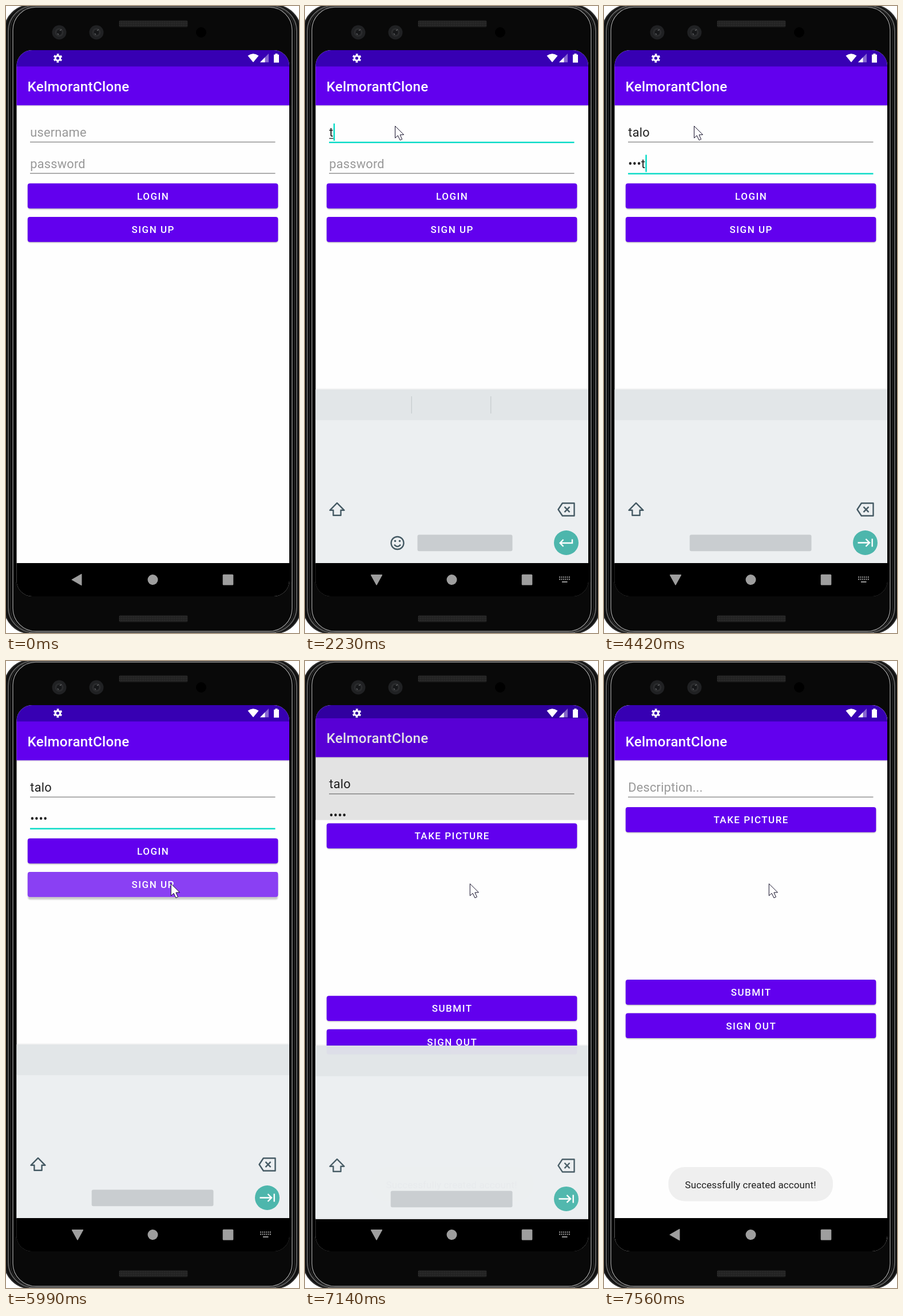
An HTML page for the animation above (8 s loop, 512x1094 px).

```html
<!DOCTYPE html>
<html lang="en">
<head>
<meta charset="utf-8">
<title>Sign up</title>
<style>
html, body { margin: 0; width: 100%; height: 100%; overflow: hidden; background: #fff; }
svg { display: block; width: 512px; height: 1094px; font-family: Roboto, sans-serif; }
.title { font-size: 24.2px; font-weight: 500; letter-spacing: .3px; fill: #fff; }
.input { font-size: 21.8px; letter-spacing: .2px; fill: #212121; }
.hint { fill: #999; }
.label { font-size: 17px; font-weight: 500; letter-spacing: 1.5px; fill: #fff; text-anchor: middle; }
.icon { fill: none; stroke: #455a64; stroke-width: 2.4; stroke-linejoin: round; }
.enter { fill: none; stroke: #fff; stroke-width: 2.4; }
</style>
</head>
<body>
<svg id="stage" viewBox="0 0 512 1094"></svg>
<script>
const LOOP = 8000;
const USER = 'talo', SECRET = 'tilt';
const USER_KEYS = [2230, 2320, 2560, 2710];
const SECRET_KEYS = [3980, 4050, 4280, 4420];
const USER_CARET = [[1200, 1750], [2230, 3190]];
const SECRET_CARET = [[3190, 3570], [3980, 4900], [5400, 5920], [6450, 6990]];
const SCREEN = { x: 18.5, y: 77, w: 476.5, h: 953 };
const USER_Y = 228, SECRET_Y = 282.6, TEXT_X = 42.3;

const rect = (x, y, w, h, fill, more = '') =>
  `<rect x="${x}" y="${y}" width="${w}" height="${h}" fill="${fill}" ${more}/>`;
const circle = (x, y, r, fill, more = '') =>
  `<circle cx="${x}" cy="${y}" r="${r}" fill="${fill}" ${more}/>`;
const path = (d, more = '') => `<path d="${d}" ${more}/>`;
const text = (x, y, cls, value, more = '') =>
  `<text x="${x}" y="${y}" class="${cls}" ${more}>${value}</text>`;
const group = (id, body, more = '') => `<g id="${id}" ${more}>${body}</g>`;

function button(y, label, id = '') {
  const ripple = id && `<g clip-path="url(#buttonClip)">${circle(292, 390, 0, '#fff', `id="${id}Ripple"`)}</g>`;
  return rect(38.3, y + 1.2, 436.8, 43.6, '#000', `rx="4" opacity=".3" filter="url(#soft)" ${id && `id="${id}Shadow"`}`) +
    rect(37.8, y, 437.6, 43.7, '#6200ee', 'rx="4"') + ripple + text(257.2, y + 28.2, 'label', label);
}

const field = (id, y, hint) =>
  text(TEXT_X, y, 'input hint', hint, `id="${id}Hint"`) +
  text(TEXT_X, y, 'input', '', `id="${id}Text"`) +
  rect(42, y + 8.7, 428.5, 1.4, '#8c8c8c', `id="${id}Line"`) +
  rect(42.4, y - 23, 2.4, 30, '#03dac5', `id="${id}Caret"`);

const appWindow = body =>
  rect(18, 77, 478, 954, '#fefefe') + rect(18, 173, 478, 2, '#000', 'opacity=".1"') +
  rect(18, 77, 478, 29, '#3700b3') + rect(18, 105.5, 478, 67.8, '#6200ee') +
  text(37.5, 149, 'title', 'KelmorantClone') + body;

const speaker = y => rect(197.5, y, 120, 12, '#1e1e1e', 'rx="2"') +
  rect(198, y + 1, 119, 10, 'url(#mesh)');

const lens = x => circle(x, 46, 12.5, '#202123') + circle(x, 46, 7.5, '#2b2c2e') +
  circle(x, 46, 4.5, '#17181a') +
  path(`M${x - 3} 48l2 2M${x + 1} 43l3 -2`, 'stroke="#66686a" stroke-width="1.3"');

const body =
  rect(-3, -1.5, 518, 1096, '#101010', 'rx="46" stroke="#2c2c2c" stroke-width="2"') +
  rect(4, 0, 504, 1093, '#0a0a0a', 'rx="44" stroke="#5c5c5c" stroke-width="2"') +
  rect(8, 1, 496, 1091, '#000', 'rx="42" stroke="#2a2a2a" stroke-width="1.6"') +
  rect(12, 2, 488, 1089, '#090909', 'rx="40" stroke="#8a8a8a" stroke-width="1.5"') +
  rect(14, 100, 485, 905, '#000') +
  lens(93) + lens(158) + circle(341, 46, 9, '#000') + speaker(25) + speaker(1063) +
  rect(40, 1093, 432, 1, '#777');

const statusIcons =
  circle(90.5, 91, 4.2, 'none', 'stroke="#fff" stroke-width="3.2"') +
  circle(90.5, 91, 6.6, 'none', `stroke="#fff" stroke-width="2.4" stroke-dasharray="3.7 3.21"
    stroke-dashoffset="1.85" transform="rotate(30 90.5 91)"`) +
  path('M422.5 86.8Q432 79.8 441.5 86.8L432 98.3Z', 'fill="#fff"') +
  path('M459 83V98.3H444Z', 'fill="#fff" opacity=".4"') +
  path('M452.5 89.6V98.3H444Z', 'fill="#fff"') +
  path('M468 84.8h2.5v-1.8h4v1.8h2.5v14h-9Z', 'fill="#fff"');

let keyDots = rect(449, 1003.8, 9.5, 2, '#9e9e9e');
for (let i = 0; i < 12; i++)
  keyDots += rect(444 + (i % 6) * 3.4, 995.5 + (i / 6 | 0) * 3.8, 2, 2, '#9e9e9e');

const rounded = 'stroke="#9e9e9e" stroke-width="1.4" stroke-linejoin="round"';
const navIcons = `<g fill="#9e9e9e">` +
  path('M115.3 1001L131.8 991.5V1010.5Z', `id="back" ${rounded}`) +
  group('imeNav', path('M115.6 992.8H134.4L125 1009.8Z', rounded) + keyDots) +
  `<circle cx="256.5" cy="1001" r="9"/><rect x="378.7" y="991.8" width="18.6" height="18.6" rx="1.5"/></g>`;

const keyboard =
  rect(18, 667, 478, 2, '#000', 'opacity=".04"') + rect(18, 669, 478, 54, '#e2e6e8') +
  rect(18, 722.5, 478, 250, '#eceff1') + rect(18, 972, 478, 60, '#000') +
  path('M43.5 879.8L56 867.2L68.5 879.8H62.6V888.8H49.4V879.8Z', 'class="icon"') +
  path('M449.8 867.5H470.5V889.5H449.8L442.5 878.5ZM453.5 873.8l9 9.4m0 -9.4l-9 9.4', 'class="icon"') +
  rect(196.5, 922.5, 166, 28.7, '#c9cdd0', 'rx="3" id="space"') +
  circle(456.5, 936.5, 21.5, '#4db6ac') +
  group('plainKeys',
    rect(185.7, 681, 1, 30, '#bfc5c8') + rect(324.3, 681, 1, 30, '#bfc5c8') +
    circle(161.5, 937, 11, 'none', 'class="icon"') +
    circle(157.5, 933.5, 1.8, '#455a64') + circle(165.5, 933.5, 1.8, '#455a64') +
    path('M156 939.8Q161.5 946.5 167 939.8', 'class="icon"') +
    path('M467 930.5V937H446M451.5 931L445.7 937L451.5 943', 'class="enter"')) +
  group('secretKeys', path('M443.5 936.5H463M457.5 930L464 936.5L457.5 943M468.7 929.5V943.5', 'class="enter"'));

const login = appWindow(
  field('user', USER_Y, 'username') + rect(TEXT_X, 230.4, 0, 1.3, '#212121', 'id="compose"') +
  field('secret', SECRET_Y, 'password') + button(309.6, 'LOGIN') + button(368, 'SIGN UP', 'press'));

const post = appWindow(
  text(TEXT_X, USER_Y, 'input hint', 'Description...') + rect(42, 236.7, 428.5, 1.4, '#8c8c8c') +
  button(255, 'TAKE PICTURE') + button(556, 'SUBMIT') + button(614.4, 'SIGN OUT'));

const toast = rect(112.5, 883, 287.5, 59.5, '#efefef', 'rx="28"') +
  text(141.5, 919.5, '', 'Successfully created account!', 'font-size="17" letter-spacing=".1" fill="#212121"');

const stage = document.getElementById('stage');
stage.innerHTML = `<defs>
  <clipPath id="screenClip">${rect(SCREEN.x, SCREEN.y, SCREEN.w, SCREEN.h, '#000', 'rx="27"')}</clipPath>
  <clipPath id="buttonClip">${rect(37.8, 368, 437.6, 43.7, '#000', 'rx="4"')}</clipPath>
  <clipPath id="revealClip">${rect(18, 77, 478, 954, '#000', 'id="reveal"')}</clipPath>
  <filter id="soft" x="-5%" y="-20%" width="110%" height="140%"><feGaussianBlur stdDeviation="1"/></filter>
  <pattern id="mesh" width="3" height="3" patternUnits="userSpaceOnUse">${rect(0, 0, 1.5, 1.5, '#3a3a3a')}</pattern>
  </defs>` + body + group('screen',
    rect(18, 77, 478, 954, '#000') +
    group('login', login) + rect(18, 77, 478, 895, '#000', 'id="dim"') +
    group('post', post, 'clip-path="url(#revealClip)"') +
    rect(18, 972, 478, 60, '#000') +
    group('keyboard', keyboard) + group('toast', toast) + statusIcons + navIcons,
    'clip-path="url(#screenClip)"') +
  path('M0 0V20.8L4.8 16.6L8.6 24.6L12.2 23L8.6 15.3L15.2 15.1Z',
    'id="mouse" fill="#fff" stroke="#15102a" stroke-width="1"');

const el = {};
stage.querySelectorAll('[id]').forEach(node => el[node.id] = node);

const set = (id, attrs) => { for (const k in attrs) el[id].setAttribute(k, attrs[k]); };
const show = (id, on) => set(id, { visibility: on ? 'visible' : 'hidden' });
const span = (t, a, b) => Math.min(1, Math.max(0, (t - a) / (b - a)));
const mix = (a, b, k) => a + (b - a) * k;
const within = (t, ranges) => ranges.some(([a, b]) => t >= a && t < b);
const typed = (t, keys) => keys.filter(k => t >= k).length;

// One cubic Bézier segment, solved for y at a given x.
function bezier(x, xs, ys) {
  const at = (p, u) => p[0] * (1 - u) ** 3 + 3 * p[1] * u * (1 - u) ** 2 + 3 * p[2] * u * u * (1 - u) + p[3] * u ** 3;
  let lo = 0, hi = 1;
  for (let i = 0; i < 24; i++) {
    const mid = (lo + hi) / 2;
    if (at(xs, mid) < x) lo = mid; else hi = mid;
  }
  return at(ys, lo);
}
const fastOutSlowIn = x => bezier(x, [0, .4, .2, 1], [0, 0, 1, 1]);
const extraSlowIn = x => x < .1667
  ? bezier(x, [0, .05, .1333, .1667], [0, 0, .06, .4])
  : bezier(x, [.1667, .2083, .25, 1], [.4, .82, 1, 1]);

function mouseAt(t) {
  const leg = (start, step, count, from, to) => {
    const k = Math.min(1, Math.floor((t - start) / step + 1e-6) / count);
    const e = k * k * (3 - 2 * k);
    return [mix(from[0], to[0], e), mix(from[1], to[1], e)];
  };
  if (t < 900) return leg(70, 74, 10, [405.5, 974.5], [154, 225.5]);
  if (t < 980) return [156, 193.5];
  if (t < 5050) return [157.5, 209.5];
  return leg(4970, 80, 6, [157.5, 209.5], [288.3, 388.7]);
}

function drawField(id, y, value, focused, caret) {
  el[id + 'Text'].textContent = value;
  show(id + 'Hint', !value);
  set(id + 'Line', focused
    ? { y: y + 8.8, height: 2.4, fill: '#03dac5' }
    : { y: y + 8.7, height: 1.4, fill: '#8c8c8c' });
  const width = value ? el[id + 'Text'].getComputedTextLength() : 0;
  set(id + 'Caret', { x: 42.4 + width });
  show(id + 'Caret', caret);
  return width;
}

function draw(t) {
  const count = typed(t, SECRET_KEYS);
  const masked = t >= 5920 ? count : Math.max(0, count - 1);
  const userWidth = drawField('user', USER_Y, USER.slice(0, typed(t, USER_KEYS)),
    t >= 1100 && t < 3190, within(t, USER_CARET));
  drawField('secret', SECRET_Y, '•'.repeat(masked) + SECRET.slice(masked, count),
    t >= 3190, within(t, SECRET_CARET));
  set('compose', { width: t < 3190 ? userWidth : 0 });

  const lift = span(t, 5730, 5850) * (1 - span(t, 6070, 6220));
  set('pressShadow', { y: 369.2 + 3.5 * lift, opacity: mix(.3, .2, lift) });
  set('pressRipple', {
    r: t < 5750 ? 0 : mix(40, 270, span(t, 5750, 5960)),
    opacity: .25 * (1 - span(t, 6070, 6220))
  });

  const open = span(t, 7024, 7449);
  const slide = fastOutSlowIn(open);
  show('post', open > 0);
  show('dim', open > 0 && open < 1);
  set('login', { transform: `translate(0 ${-18.5 * slide})` });
  set('dim', { opacity: .105 * span(t, 7010, 7130) });
  set('post', { transform: `translate(0 ${40.3 * (1 - slide)})` });
  const top = .96 * SCREEN.h * (1 - extraSlowIn(open));
  set('reveal', { y: SCREEN.y + top, height: 954 - top });

  const hidden = t < 4000 ? (1 - span(t, 1400, 1750)) ** 3 : span(t, 7095, 7350) ** 2;
  set('keyboard', { transform: `translate(0 ${60 * hidden})`, opacity: 1 - hidden });
  const secretKeys = t >= 3260;
  show('plainKeys', !secretKeys);
  show('secretKeys', secretKeys);
  set('space', secretKeys ? { x: 149.7, width: 212.8 } : { x: 196.5, width: 166 });

  const ime = t >= 1370 && t < 7390;
  show('back', !ime);
  show('imeNav', ime);
  set('toast', { opacity: span(t, 7135, 7540) });

  const [x, y] = mouseAt(t);
  show('mouse', t >= 70);
  set('mouse', { transform: `translate(${x} ${y})` });
}

const start = performance.now();
function tick() {
  draw((performance.now() - start) % LOOP);
  requestAnimationFrame(tick);
}
tick();
</script>
</body>
</html>
```
